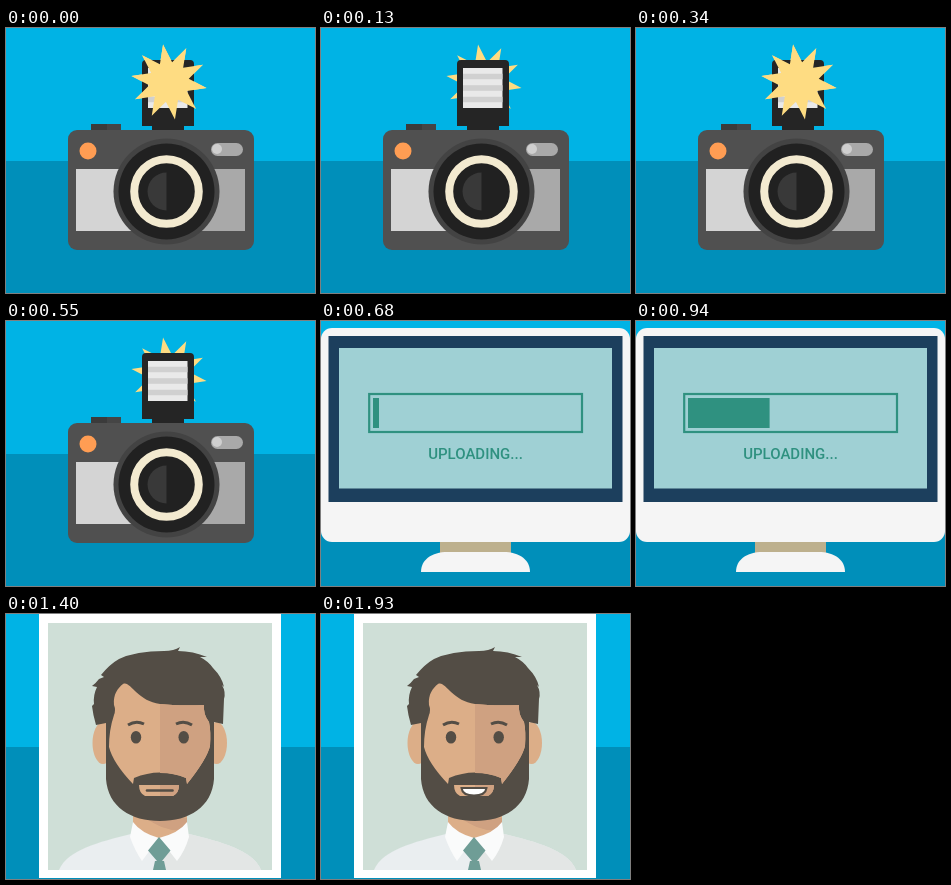
An HTML page for the animation above (3.66 s loop, 309 by 265 pixels).

```html
<!DOCTYPE html>
<html lang="en">
<head>
<meta charset="utf-8">
<title>Photo upload</title>
<style>
  html, body { margin: 0; width: 100%; height: 100%; overflow: hidden; }
  svg { display: block; width: 100%; height: 100%; }
  text { font: 500 15px Roboto, sans-serif; }
</style>
</head>
<body>
<svg viewBox="0 0 309 265">
  <rect width="309" height="265" fill="#00b3e5"/>
  <rect y="133" width="309" height="132" fill="#008fba"/>

  <g id="camera">
    <polygon id="burstBack" fill="#fedc82"/>
    <path d="M85 96h30v8H85z" fill="#3b3b3b"/>
    <path d="M101 96h14v8h-14z" fill="#454545"/>
    <path d="M136 98V36q0-4 4-4h44q4 0 4 4v62h-10v6h-32v-6z" fill="#252525"/>
    <path d="M142 40h39.5v40H142z" fill="#e9e9e9"/>
    <path d="M142 48.5h39.5M142 60h39.5M142 71.5h39.5" stroke="#d0d0d0" stroke-width="5.5"/>
    <polygon id="burstFront" fill="#fedc82"/>
    <rect x="62" y="102" width="186" height="120" rx="9" fill="#505050"/>
    <path d="M70 141h85v62H70z" fill="#d4d4d4"/>
    <path d="M155 141h84v62h-84z" fill="#a9a9a9"/>
    <circle cx="82" cy="123" r="8.5" fill="#ff9d53"/>
    <rect x="205" y="115" width="32" height="13" rx="6.5" fill="#a9a9a9"/>
    <circle cx="211" cy="121" r="5" fill="#cfcfcf"/>
    <circle cx="160.5" cy="163.5" r="53" fill="#434343"/>
    <circle cx="160.5" cy="163.5" r="48" fill="#212121"/>
    <circle cx="160.5" cy="163.5" r="32.3" fill="none" stroke="#f3ead0" stroke-width="8"/>
    <path d="M160.5 144.5a19 19 0 0 0 0 38z" fill="#393939"/>
  </g>

  <g id="monitor">
    <rect y="7" width="309" height="214" rx="11" fill="#f5f5f5"/>
    <path d="M7.500 15h294v166H7.500z" fill="#1c3f5d"/>
    <path d="M18 27h273v140.500H18z" fill="#9fd0d4"/>
    <rect x="48.200" y="73" width="212.800" height="38" fill="none" stroke="#2f9180" stroke-width="2.200"/>
    <rect id="bar" x="52" y="77" height="30" fill="#2f9180"/>
    <text x="154.500" y="138" text-anchor="middle" fill="#2f9180">UPLOADING...</text>
    <path d="M119 221h71v12h-71z" fill="#bdb08d"/>
    <path d="M100 251c0-12 10-20 27-20h55c17 0 27 8 27 20z" fill="#f5f5f5"/>
  </g>

  <g id="portrait">
    <path d="M33 0h242v264H33z" fill="#fff"/>
    <path d="M42 9h224v247H42z" fill="#cfdfd7"/>
    <path d="M53 256c8-20 40-28 72-36h58c32 8 64 16 72 36z" fill="#eaeef0"/>
    <path d="M154 220h29c32 8 64 16 72 36H154z" fill="#e3e6e5"/>
    <path d="M127 190h54v25l-28 11-26-11z" fill="#dcae88"/>
    <path d="M140 204h41v12q-22 3-41-12z" fill="#cfa181"/>
    <path d="M127 208q8 11 26 16l-17 23q-7-10-12-24zM181 208q-8 11-28 16l18 23q8-10 12-24z" fill="#fafbfb"/>
    <path d="M153 223l11.500 13.500L156 247h2l2 9h-13l2-9h2l-9-10.500z" fill="#6f9d96"/>
    <ellipse cx="97" cy="129" rx="10.500" ry="21" fill="#dcae88"/>
    <ellipse cx="210.500" cy="129" rx="10.500" ry="21" fill="#dcae88"/>
    <path fill="#534d45" d="M100 109l-10 2q-3-10-4-19l2-2q-1-9 3-17l-5-1q4-3 7-7l5-2-3-2q9-11 18-16 17-8 45-8 10 0 16-4l-2 4q15 0 29 6l-7 0q8 4 13 11 9 9 11 19l-2-2q4 7 2 14l-1 25-9-2v57c-2 28-25 42-54 42s-52-14-54-42z"/>
    <path id="face" fill="#dcae88" d="M108 101q2-5 0-10c-1-11 4-17 9-21 7-4 14 17 37 20q18 2 44 1-1 9 5 17 2 9 1 24-3 13-23 38l-1-6q-26-11-52 0l-1 6q-20-21-24-37 0-17 5-32z"/>
    <path fill="#cfa181" d="M154 90q18 2 44 1-1 9 5 17 2 9 1 24-3 13-23 38l-1-6q-12-5-26-5z"/>
    <g fill="#534d45">
      <ellipse cx="130" cy="123.300" rx="5.200" ry="6.300"/>
      <ellipse cx="177.700" cy="123.300" rx="5.200" ry="6.300"/>
    </g>
    <path d="M122 111q8-5 16-1M170 110q8-4 16 1" fill="none" stroke="#534d45" stroke-width="3"/>
    <path d="M133 171h40q0 8-6 11h-28q-6-3-6-11z" fill="#dcae88"/>
    <path d="M154 171h19q0 8-6 11h-13z" fill="#cfa181"/>
    <path id="calm" d="M141 176.500h25.500" stroke="#534d45" stroke-width="2.600" stroke-linecap="round"/>
    <path id="smile" d="M140.500 174h25q-1 7.500-12.500 7.500t-12.500-7.500z" fill="#fff" stroke="#534d45" stroke-width="2"/>
  </g>
</svg>
<script>
const LOOP = 3660, FLASH_END = 680, UPLOAD_END = 1400, SMILE_AT = 1930;
const el = id => document.getElementById(id);
const show = (id, visible) => el(id).style.display = visible ? '' : 'none';

const burst = Array.from({ length: 20 }, (_, i) => {
  const angle = (-99 + i * 18) * Math.PI / 180;
  const radius = i % 2 ? 20 : 38;
  return [163 + radius * Math.cos(angle), 54 + radius * Math.sin(angle)];
}).join(' ');
el('burstBack').setAttribute('points', burst);
el('burstFront').setAttribute('points', burst);

function draw(now) {
  const t = now % LOOP;
  show('camera', t < FLASH_END);
  show('monitor', t >= FLASH_END && t < UPLOAD_END);
  show('portrait', t >= UPLOAD_END);

  const blink = t < 130 ? 0 : Math.min(7, 1 + Math.floor((t - 130) / 70));
  show('burstFront', blink % 2 === 0);

  const step = Math.max(0, Math.min(5, Math.floor((t - FLASH_END) / 130)));
  el('bar').setAttribute('width', 6 + 37.8 * step);

  show('calm', t < SMILE_AT);
  show('smile', t >= SMILE_AT);
  requestAnimationFrame(() => draw(performance.now()));
}
draw(performance.now());
</script>
</body>
</html>
```
